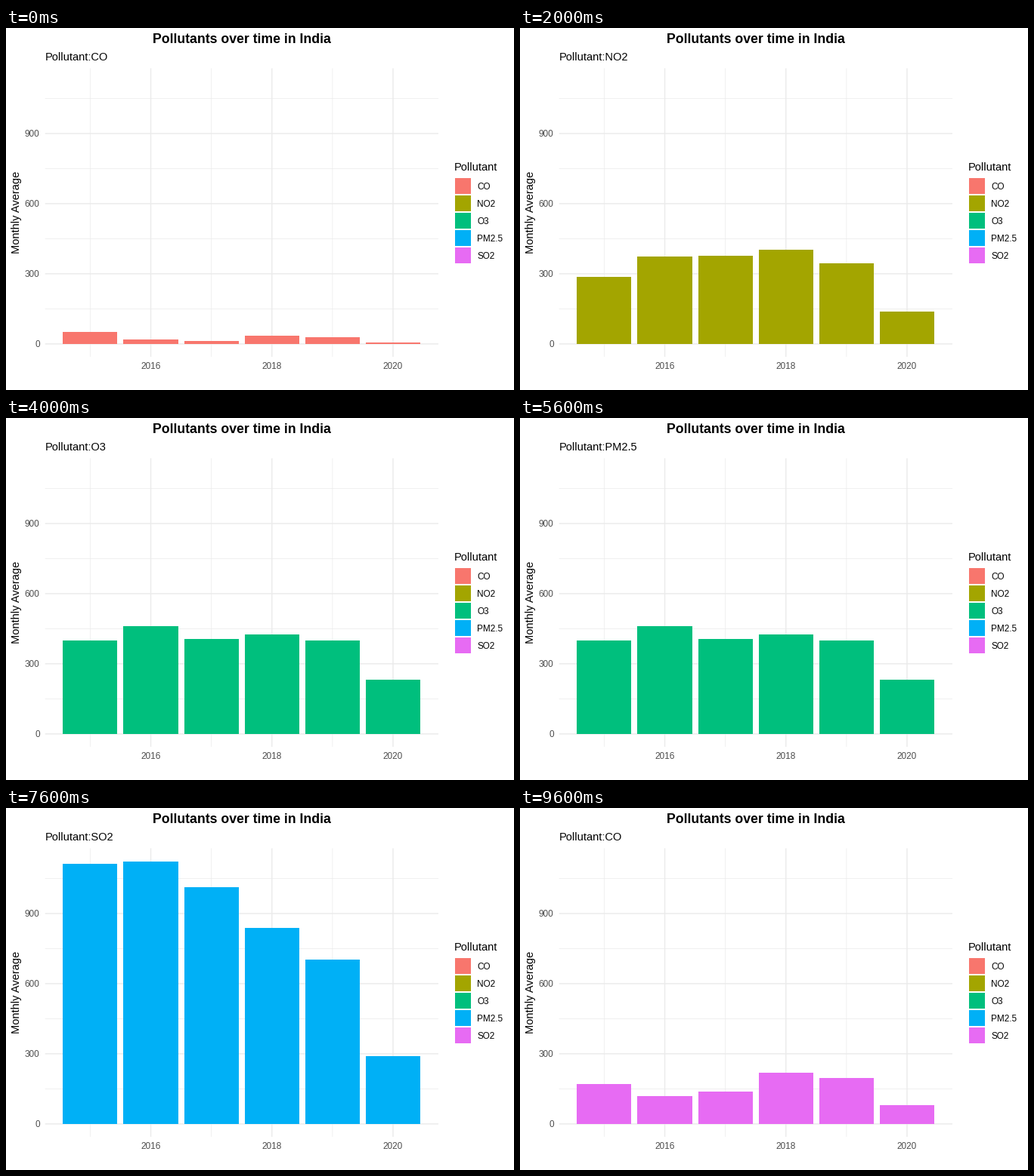
These frames come from a looping animation (672x480 px, 10000 ms). A matplotlib script:

```python
import matplotlib.pyplot as plt
from matplotlib.animation import FuncAnimation
from matplotlib.patches import Rectangle

W, H, DPI = 672, 480, 96
STEPS = 5  # 400 ms steps per pollutant

plt.rcParams["font.family"] = "Liberation Sans"

# Colour and bar tops (stage pixels) for 2015 to 2020
POLLUTANTS = {
    "CO": ("#F8766D", (403, 413, 415, 408, 410, 417)),
    "NO2": ("#A3A500", (330, 303, 302, 294, 312, 376)),
    "O3": ("#00BF7D", (295, 276, 293, 287, 295, 347)),
    "PM2.5": ("#00B0F6", (74, 71, 105, 159, 201, 329)),
    "SO2": ("#E76BF3", (366, 382, 376, 351, 358, 394)),
}
NAMES = list(POLLUTANTS)
LEFT, RIGHT, TOP, BOTTOM = 51.7, 572, 53.4, 436
BASE = 419

fig = plt.figure(figsize=(W / DPI, H / DPI), dpi=DPI, facecolor="white")
ax = fig.add_axes([0, 0, 1, 1])
ax.set_xlim(0, W)
ax.set_ylim(H, 0)
ax.axis("off")


def year_x(year):
    return 111.4 + 80.12 * (year - 2015)


def value_y(value):
    return 418.9 - 0.31 * value


def grid_line(xs, ys, major):
    ax.plot(xs, ys, color="#EBEBEB", lw=1.07 if major else 0.53,
            solid_capstyle="butt", snap=False, zorder=2 if major else 1)


def label(x, y, text, size=8.8, **kw):
    return ax.text(x, y, text, fontsize=size, va="baseline", **kw)


def block(x0, y0, x1, y1, color):
    rect = Rectangle((x0, y0), x1 - x0, y1 - y0, fc=color, lw=0,
                     antialiased=False, zorder=3)
    return ax.add_patch(rect)


for value in range(0, 1051, 150):
    major = value % 300 == 0
    y = value_y(value)
    grid_line((LEFT, RIGHT), (y, y), major)
    if major:
        label(44.7, y + 4.3, str(value), ha="right", color="#4D4D4D")

for year in range(2015, 2021):
    major = year % 2 == 0
    x = year_x(year)
    grid_line((x, x), (TOP, BOTTOM), major)
    if major:
        label(x, 452, str(year), ha="center", color="#4D4D4D")

label(312, 20, "Pollutants over time in India", 13.2, ha="center", weight="bold")
label(18, 244.7, "Monthly Average", 11, ha="center", rotation=90,
      rotation_mode="anchor")
subtitle = label(52, 43, "", 11)

label(593, 189, "Pollutant", 11)
for i, (name, (color, _)) in enumerate(POLLUTANTS.items()):
    y = 199 + 23 * i
    block(594, y, 615, y + 21, color)
    label(623, y + 15, name)

bars = [block(round(year_x(year) - 36.06), BASE, round(year_x(year) + 36.06), BASE, "w")
        for year in range(2015, 2021)]


def draw(frame):
    # The subtitle switches one step ahead of the bars.
    subtitle.set_text("Pollutant:" + NAMES[(frame + 1) // STEPS % len(NAMES)])
    color, tops = POLLUTANTS[NAMES[frame // STEPS]]
    for bar, top in zip(bars, tops):
        bar.set_y(top)
        bar.set_height(BASE - top)
        bar.set_facecolor(color)
    return [subtitle, *bars]


anim = FuncAnimation(fig, draw, frames=STEPS * len(NAMES), interval=400,
                     repeat=True, repeat_delay=0)
plt.show()
```
